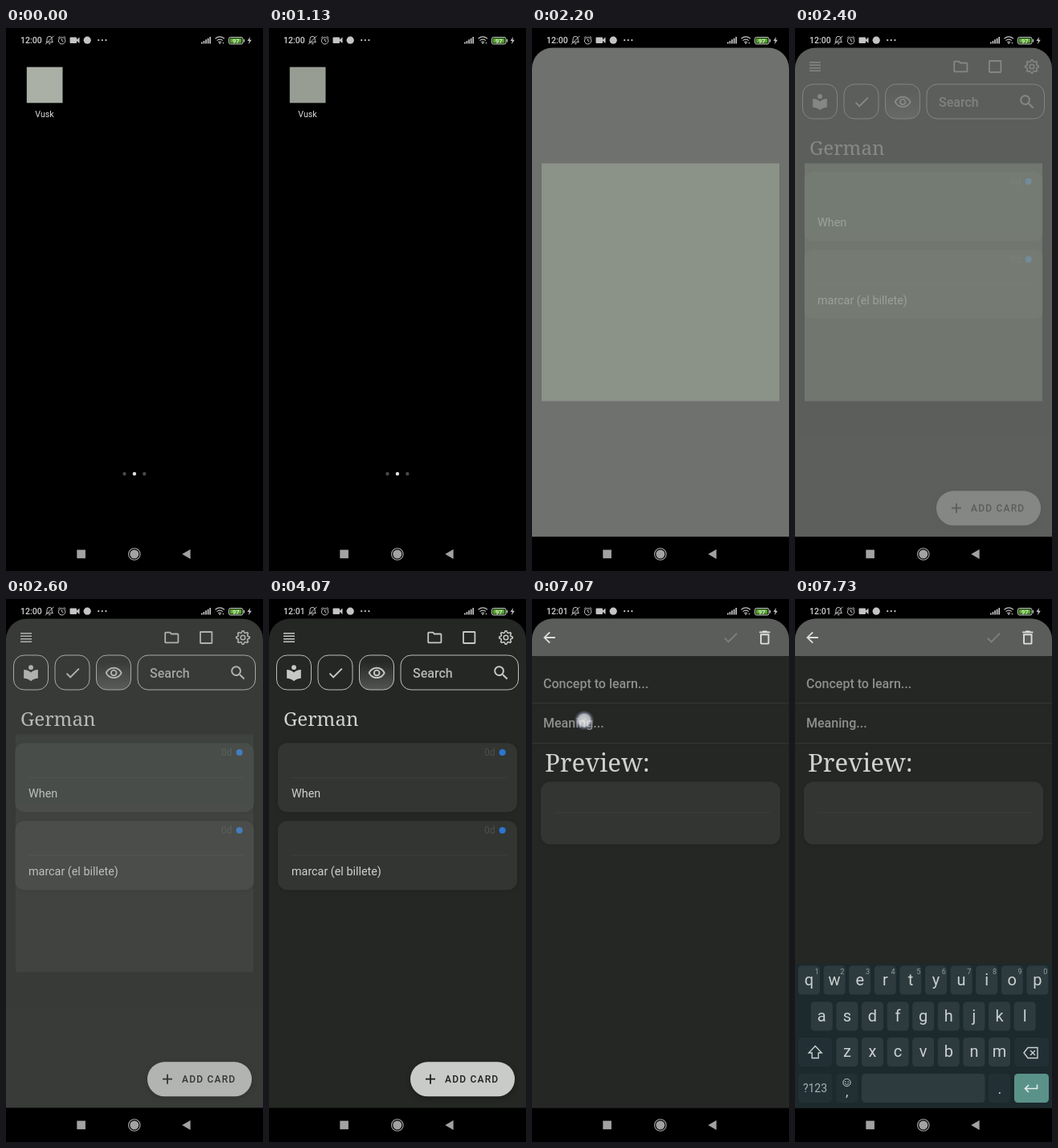
These frames come from a looping animation (320x676 px, 8 s). An HTML page:

```html
<!DOCTYPE html>
<html lang="en">
<head>
<meta charset="utf-8">
<title>Flashcard app</title>
<style>
html, body { margin: 0; width: 100%; height: 100%; overflow: hidden; background: #000; }
svg { display: block; width: 320px; height: 676px; font-family: Roboto, sans-serif; }
.slab { font-family: "Noto Serif", serif; font-weight: 300; fill: #d0d2d0; }
.medium { font-weight: 500; }
.mid { text-anchor: middle; }
.line { fill: none; stroke: #c6c8c6; }
.raised { filter: drop-shadow(0 2px 3px rgba(0, 0, 0, .3)); }
.flat { filter: drop-shadow(0 1px 2px rgba(0, 0, 0, .12)); }
</style>
</head>
<body>
<svg id="stage" viewBox="0 0 320 676"></svg>
<script>
const paths = {
  reader: 'M12 11.55C9.64 9.35 6.48 8 3 8v11c3.48 0 6.64 1.35 9 3.55 2.36-2.19 5.52-3.55 9-3.55V8c-3.48 0-6.64 1.35-9 3.55zM12 8a3 3 0 100-6 3 3 0 000 6z',
  check: 'M9 16.17L4.83 12l-1.42 1.41L9 19 21 7l-1.41-1.41z',
  eye: 'M12 6c3.79 0 7.17 2.13 8.82 5.5C19.17 14.87 15.79 17 12 17s-7.17-2.13-8.82-5.5C4.83 8.13 8.21 6 12 6m0-2C7 4 2.73 7.11 1 11.5 2.73 15.89 7 19 12 19s9.27-3.11 11-7.5C21.27 7.11 17 4 12 4zm0 5a2.5 2.5 0 010 5 2.5 2.5 0 010-5m0-2a4.5 4.5 0 000 9 4.5 4.5 0 000-9z',
  search: 'M15.5 14h-.79l-.28-.27A6.47 6.47 0 0016 9.5 6.5 6.5 0 109.5 16c1.61 0 3.09-.59 4.23-1.57l.27.28v.79l5 4.99L20.49 19zm-6 0a4.5 4.5 0 110-9 4.5 4.5 0 010 9z',
  folder: 'M9.17 6l2 2H20v10H4V6h5.17M10 4H4c-1.1 0-1.99.9-1.99 2L2 18c0 1.1.9 2 2 2h16c1.1 0 2-.9 2-2V8c0-1.1-.9-2-2-2h-8l-2-2z',
  trash: 'M6 19c0 1.1.9 2 2 2h8c1.1 0 2-.9 2-2V7H6v12zM8 9h8v10H8V9zm7.5-5l-1-1h-5l-1 1H5v2h14V4z',
  back: 'M20 11H7.83l5.59-5.59L12 4l-8 8 8 8 1.41-1.41L7.83 13H20z'
};

const icon = (name, x, y, size, fill = '#c6c8c6') =>
  `<path d="${paths[name]}" fill="${fill}" fill-rule="evenodd" transform="translate(${x} ${y}) scale(${size}) translate(-12 -12)"/>`;
const rect = (x, y, w, h, r, fill, more = '') =>
  `<rect x="${x}" y="${y}" width="${w}" height="${h}" rx="${r}" fill="${fill}" ${more}/>`;
const dot = (x, y, r, fill, more = '') => `<circle cx="${x}" cy="${y}" r="${r}" fill="${fill}" ${more}/>`;
const text = (x, y, size, fill, str, cls = '') =>
  `<text x="${x}" y="${y}" font-size="${size}" fill="${fill}" class="${cls}">${str}</text>`;
const line = (d, width, color = '#c6c8c6') =>
  `<path d="${d}" class="line" stroke-width="${width}" style="stroke:${color}"/>`;
const each = (list, fn) => [...list].map(fn).join('');

function gear(x, y) {
  const points = [];
  for (let i = 0; i < 32; i++) {
    const a = (i - 1.5) / 32 * 2 * Math.PI, r = i % 4 === 1 || i % 4 === 2 ? 8.3 : 6.3;
    points.push((x + r * Math.cos(a)).toFixed(2) + ' ' + (y + r * Math.sin(a)).toFixed(2));
  }
  return line('M' + points.join('L') + 'z', 1.6) + dot(x, y, 2.8, 'none', 'stroke="#c6c8c6" stroke-width="1.5"');
}

function statusBar() {
  const c = '#c4c4c4';
  return `<text id="clock" x="18" y="19" font-size="10.5" fill="#d0d0d0" class="medium"></text>`
    + line('M50 17.7h8.4l-1.2-1.7v-2.5a3.1 3.1 0 0 0-6.2 0v2.5zM53 19.7h2.5M49 20.3l10.5-10.5', 1, c)
    + dot(69.6, 15.8, 4.2, 'none', `stroke="${c}"`) + line('M69.6 13.2v2.8l1.9 1M64.8 12.6l2.5-2.2M74.4 12.6l-2.5-2.2', 1, c)
    + rect(79.5, 11.5, 8.5, 7.5, 1, c) + `<path d="M88 14.5l3.5-3v7.5l-3.5-3z" fill="${c}"/>`
    + dot(101.2, 15.2, 4.6, c)
    + each([115.2, 119.8, 124.4], x => dot(x, 15.2, 1.1, c))
    + each([0, 1, 2, 3, 4], i => rect(243 + i * 2.6, 17.5 - i * 1.6, 1.7, 2 + i * 1.6, .3, c))
    + line('M260.5 13.2q5.7-4.6 11.4 0M262.5 15.6q3.7-2.9 7.4 0M264.3 17.7q1.9-1.4 3.8 0', 1.2, c)
    + dot(266.2, 19, .9, c) + dot(270.5, 18.6, .8, c)
    + rect(277.5, 11.5, 17.5, 8.5, 2, '#17330f', `stroke="${c}"`) + rect(279, 13, 14, 5.5, 1, '#57a52e')
    + rect(295.8, 14, 1.3, 3.5, .5, c) + text(286.2, 18.5, 7.5, '#e8f0e4', '97', 'mid medium')
    + `<path d="M304 11l-3.5 5h2.3l-.8 4.2 3.8-5.4h-2.4z" fill="${c}"/>`;
}

const navBar = () => rect(88.3, 649.6, 10.6, 10.6, 0, '#a2a2a2')
  + dot(159.8, 655, 7.3, 'none', 'stroke="#a8a8a8" stroke-width="1.1"') + dot(159.8, 655, 5.5, '#a2a2a2')
  + '<path d="M219.3 655l10.3-6v12z" fill="#a2a2a2"/>';

const home = () => `<g id="appIcon">${rect(25.8, 48.6, 44.7, 44.7, 0, '#aab0a6')}</g>`
  + text(48, 111, 10.6, '#dedede', 'Vusk', 'mid')
  + dot(147.5, 555, 2.2, '#484848') + dot(159.9, 555, 2.2, '#e2e2e2') + dot(172.3, 555, 2.2, '#484848');

const card = (y, h, split) => rect(11, y, 298, h, 12, '#333533', 'class="flat"')
  + line(`M27 ${split}H296`, 1, '#3d3f3d');

const wordCard = (y, word) => card(y, 86, y + 43)
  + text(268, y + 16, 12, '#4c4e4c', '0d') + dot(290.6, y + 11.7, 4, '#2b76d2')
  + text(28, y + 68, 14.35, '#cfd1cf', word);

function deck() {
  const frame = (x, w, fill) => rect(x, 70, w, 43, 13, fill, 'stroke="#bcbebc"');
  return rect(0, 24, 320, 610, 0, '#252725')
    + line('M18 42.8h14M18 46.3h14M18 49.8h14M18 53.3h14', 1.4)
    + icon('folder', 206.3, 48, .9) + rect(242, 41, 14.4, 14, .5, 'none', 'stroke="#c6c8c6" stroke-width="1.8"') + gear(295, 48)
    + frame(9.5, 43, 'none') + frame(61, 43, 'none') + frame(112.5, 43, 'url(#shine)') + frame(164, 146.5, 'none')
    + icon('reader', 31, 92, .98) + icon('check', 83, 92, .95) + icon('eye', 134.2, 92.4, .95) + icon('search', 289, 92, .98)
    + text(179, 97.5, 16, '#b4b6b4', 'Search', 'medium')
    + text(18, 158, 24.2, '', 'German', 'slab')
    + wordCard(179.3, 'When') + wordCard(276.2, 'marcar (el billete)')
    + rect(176, 576.3, 130, 43, 21.5, '#c9cbc9', 'class="raised"')
    + line('M201 591.7v12M195 597.7h12', 1.8, '#1d1f1d')
    + `<text x="219" y="602" font-size="12" letter-spacing="1.2" fill="#1d1f1d" class="medium">ADD CARD</text>`;
}

const editor = () => rect(0, 24, 320, 610, 0, '#252725') + rect(0, 24, 320, 47, 0, '#5b5d5b')
  + icon('back', 21.5, 48, .92, '#dcdedc') + icon('check', 247.3, 48, .95, '#7d7f7d') + icon('trash', 289.8, 48, .95, '#dcdedc')
  + text(14, 110.6, 16, '#8d8f8d', 'Concept to learn...', 'medium')
  + text(14, 159.5, 16, '#8d8f8d', 'Meaning...', 'medium')
  + line('M0 129.5h320M0 179.5h320', 1, '#343634')
  + text(16, 215, 31.2, '', 'Preview:', 'slab') + card(227.5, 78, 266);

function keyboard() {
  const ink = '#c9d0d1', plain = '#2e3b3e', dark = '#223035', pitch = 31.6;
  const key = (x, y, w, fill) => rect(x, y, w, 36, 4.5, fill);
  const row = (letters, x0, y) => each(letters, (ch, i) =>
    key(x0 + i * pitch, y, 27, plain) + text(x0 + i * pitch + 13.5, y + 24.3, 20, ink, ch, 'mid'));
  return rect(0, 454, 320, 180, 0, '#1c292d')
    + row('qwertyuiop', 4, 456.5) + each('1234567890', (n, i) => text(27.3 + i * pitch, 466.5, 9, '#939c9e', n, 'mid'))
    + row('asdfghjkl', 19.8, 501.5) + row('zxcvbnm', 51.4, 546)
    + key(4, 546, 42, dark) + key(273, 546, 43, dark)
    + line('M25.2 556.5l8 8.5h-4v6.5h-8v-6.5h-4z', 1.4, ink)
    + line('M285 565l5-6.5h12v13h-12zM293 562l6 6M299 562l-6 6', 1.4, ink)
    + key(4, 591, 42, dark) + text(25, 614.3, 14, '#a9b2b4', '?123', 'mid')
    + key(51.4, 591, 27, dark) + dot(64.5, 602, 4.6, 'none', `stroke="${ink}"`)
    + dot(62.8, 601, .8, ink) + dot(66.2, 601, .8, ink) + line('M62 603.3q2.5 2.4 5 0', .9, ink)
    + text(64.8, 618.5, 17, ink, ',', 'mid')
    + key(83, 591, 153.5, plain) + key(241, 591, 27, dark) + text(254.8, 616, 18, ink, '.', 'mid')
    + key(273, 591, 43, '#5a928a') + line('M301.5 604.5v5H287M291 605l-4.5 4.5 4.5 4.5', 1.6, '#e3eceb');
}

const group = (id, body) => `<g id="${id}">${body}</g>`;
document.getElementById('stage').innerHTML = `<defs>
  <clipPath id="screen"><path d="M0 633.4V50.5a26 26 0 0 1 26-26H294a26 26 0 0 1 26 26V633.4z"/></clipPath>
  <linearGradient id="shine" x2="0" y2="1"><stop offset=".2" stop-color="#272927"/><stop offset="1" stop-color="#535553"/></linearGradient>
  <radialGradient id="glow"><stop offset="0" stop-color="#fff" stop-opacity=".8"/><stop offset=".6" stop-color="#eceef4" stop-opacity=".72"/>
    <stop offset=".76" stop-color="#8f98b4" stop-opacity=".5"/><stop offset="1" stop-color="#6f7896" stop-opacity="0"/></radialGradient>
</defs>`
  + rect(0, 0, 320, 676, 0, '#000') + group('home', home())
  + `<g clip-path="url(#screen)">` + group('deck', deck()) + group('editor', editor()) + group('keys', keyboard())
  + group('splash', '<rect id="pane" fill="#6f716e"/><rect id="mark" fill="#8b9288"/>') + '</g>'
  + statusBar() + navBar() + dot(0, 0, 12.5, 'url(#glow)', 'id="touch"');

const $ = id => document.getElementById(id);
const set = (id, values) => { for (const k in values) $(id).setAttribute(k, values[k]); };
const show = (id, alpha) => set(id, { opacity: alpha, display: alpha > 0 ? 'inline' : 'none' });
const ramp = (t, a, b) => Math.min(1, Math.max(0, (t - a) / (b - a)));
const smooth = p => p * p * (3 - 2 * p);
const mix = (a, b, p) => a + (b - a) * p;

// x, y, time down, start of fade, time gone
const taps = [[48, 71, 470, 670, 870], [231, 597, 5460, 5580, 5680], [65, 151, 7060, 7180, 7335]];

function render(t) {
  $('clock').textContent = t < 4070 ? '12:00' : '12:01';

  const press = ramp(t, 470, 670) - ramp(t, 870, 1270);
  const launch = ramp(t, 1270, 1730), grow = 1 - (1 - launch) ** 2.41;
  show('home', 1 - ramp(launch, 0, .4));
  set('appIcon', { opacity: 1 - .3 * press });

  // The window grows out of the icon; its content keeps the window's width scale.
  const x = mix(25.5, 0, grow), w = mix(45, 320, grow), y = 24.5 + 23.5 * (1 - grow) ** 3;
  const k = w / 320;
  set('pane', { x, y, width: w, height: mix(94, 633.4, grow) - y });
  set('mark', { x: x + 12 * k, y: y + 144 * k, width: 296 * k, height: 296 * k });
  show('splash', Math.min(1, launch * 1.27) * (1 - smooth(ramp(t, 2210, 2800))));

  show('deck', t >= 2130 ? 1 : 0);
  show('editor', smooth(ramp(t, 5600, 5930)));
  const rise = 1 - (1 - ramp(t, 7430, 7730)) ** 2;
  show('keys', rise > 0 ? 1 : 0);
  set('keys', { transform: `translate(0 ${180 * (1 - rise)})` });

  const tap = taps.find(p => t >= p[2] && t < p[4]);
  show('touch', tap ? 1 - ramp(t, tap[3], tap[4]) : 0);
  if (tap) set('touch', { cx: tap[0], cy: tap[1] });
}

function tick() {
  render(performance.now() % 8000);
  requestAnimationFrame(tick);
}
tick();
</script>
</body>
</html>
```
